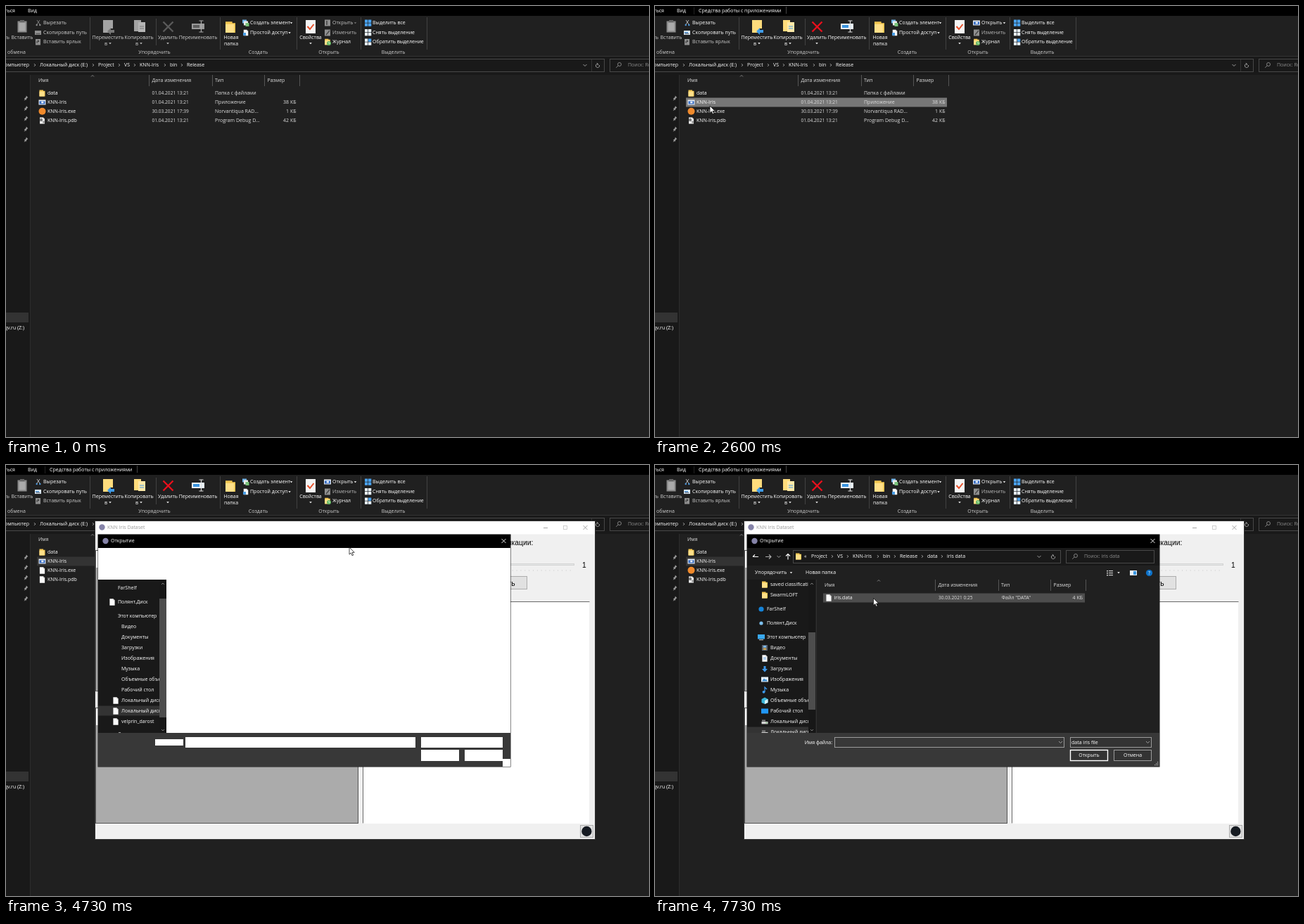
An HTML page for the animation above (8000 ms loop, 914 by 613 pixels).

```html
<!DOCTYPE html>
<html lang="ru">
<head>
<meta charset="utf-8">
<title>KNN Iris</title>
<style>
html, body { margin: 0; width: 100%; height: 100%; overflow: hidden; background: #202020; }
svg { display: block; }
#stage { width: 100vw; height: 100vh; }
text { font-family: "Open Sans", "Noto Sans", sans-serif; white-space: pre; }
text.form { font-family: "Liberation Sans", sans-serif; }
</style>
</head>
<body>
<svg id="stage" viewBox="0 0 914 613"></svg>
<script>
const LOOP = 8000;
const stage = document.getElementById('stage');

// Drawing helpers; text is placed by its vertical centre.
const rect = (x, y, w, h, fill, more = '') =>
  `<rect x="${x}" y="${y}" width="${w}" height="${h}" fill="${fill}" ${more}/>`;
const frame = (x, y, w, h, stroke, fill = 'none', sw = 1) =>
  rect(x + .5, y + .5, w - 1, h - 1, fill, `stroke="${stroke}" stroke-width="${sw}"`);
const dot = (x, y, r, fill) => `<circle cx="${x}" cy="${y}" r="${r}" fill="${fill}"/>`;
const line = (d, stroke = '#fff', sw = 1) =>
  `<path d="${d}" fill="none" stroke="${stroke}" stroke-width="${sw}"/>`;
const fill = (d, color) => `<path d="${d}" fill="${color}"/>`;
const at = (x, y, body, s = 1) => `<g transform="translate(${x} ${y}) scale(${s})">${body}</g>`;
const group = (id, body) => `<g id="${id}">${body}</g>`;
const text = (x, y, s, color = '#fff', anchor = 'start', size = /^\d\d\./.test(s) ? 6.6 : 7, cls = '') =>
  `<text class="${cls}" x="${x}" y="${y + size * .35}" font-size="${size}" fill="${color}" text-anchor="${anchor}">${s}</text>`;
const mid = (x, y, s, color) => text(x, y, s, color, 'middle');
const form = (x, y, s, size = 10.3, anchor = 'start') => text(x, y, s, '#000', anchor, size, 'form');
const down = (x, y, color = '#fff') => fill(`M${x - 1.8} ${y - .8}h3.6l-1.8 2z`, color);
const chevron = (x, y, color = '#aaa') => line(`M${x - 2.5} ${y - 1}l2.5 2.5 2.5-2.5`, color, .9);
const next = (x, y) => line(`M${x - 1} ${y - 1.8}l1.8 1.8-1.8 1.8`, '#ccc', .8);
const cross = (x, y, r, color, sw = 1) =>
  line(`M${x - r} ${y - r}l${2 * r} ${2 * r}m0 ${-2 * r}l${-2 * r} ${2 * r}`, color, sw);

// Small icons
const folder = (x, y, s = 1) => at(x, y,
  fill('M-4-4.5h5.5v1.2H4V4.5h-8z', '#f3c650') + fill('M-4-2.4h7v6.9h-7z', '#ffe08a'), s);
const doc = (x, y, s = 1) => at(x, y,
  fill('M-3.6-4.8h5l2.2 2.2v7.4h-7.2z', '#fafafa') + fill('M1.4-4.8v2.2h2.2z', '#bbb'), s);
const app = (x, y, c = '#3a6fc4') => at(x, y,
  rect(-5, -3.5, 10, 7, '#e9eef5') + rect(-4, -1.7, 8, 4.2, c) + rect(-1.2, -1.2, 3, 2.5, '#fff'));
const pin = y => at(28, y, fill('M.8-3.4l2.6 2.6-1 .3-1.3 1.5-.1 1.5-1.2-.2-2.2 1.4 1.2-2.4-1.1-1.2 1.4 0L.5-1.8z', '#999'));
const lens = (x, y) => `<circle cx="${x + 1}" cy="${y - 1}" r="2.5" fill="none" stroke="#999" stroke-width=".8"/>` +
  line(`M${x - .8} ${y + .8}l-3 3`, '#999', .8);
const refresh = (x, y) => line(`M${x + 2.4} ${y - 1}a2.6 2.6 0 1 1-2-1.6m0 0l-1.6-1.2m1.6 1.2v2`, '#bbb', .8);
const disk = rect(-4.5, 0, 9, 3.4, '#d6d6d6') + rect(1.5, 1.2, 2, 1, '#4a4') + rect(-4, -2.5, 5, 2, '#888');

function ribbon(on) {
  const ink = on ? '#fff' : '#cfcfcf';
  const c = color => on ? color : '#8f8f8f';
  const tile = (x, y, color) => [0, 1, 2, 3].map(i =>
    rect(x + i % 2 * 5, y + (i >> 1) * 5, 4.3, 4.3, i === color ? '#4aa3f0' : color < 0 ? '#4aa3f0' : '#e8f2fc')).join('');
  const big = (x, body) => at(x, 29, body);
  const sheet = on ? '#ffdc7c' : '#a3a3a3';
  return rect(0, 0, 914, 14, '#000') + rect(0, 14, 914, 58, '#202020') +
    text(13, 7, 'ться', '#fff', 'end') + text(31, 7, 'Вид') +
    (on ? text(62, 7, 'Средства работы с приложениями') + rect(55, 2, 1, 10, '#222') + rect(186, 1, 1, 10, '#444') : '') +
    [119, 304, 413, 504, 598].map(x => rect(x, 16, 1, 46, '#414141')).join('') + rect(213, 18, 1, 38, '#414141') +
    text(2, 66, 'обмена', '#ccc') + mid(211, 66, 'Упорядочить', '#ccc') + mid(358.5, 66, 'Создать', '#ccc') +
    mid(459, 66, 'Открыть', '#ccc') + mid(550.5, 66, 'Выделить', '#ccc') +
    // clipboard
    text(5, 45, 'ть', '#ccc', 'end') + mid(23, 45, 'Вставить', '#cfcfcf') +
    rect(16.5, 21.5, 13, 16, '#8a8a8a') + rect(18.5, 24, 9, 11.5, '#aaa') + rect(20, 20, 6, 3, '#666') +
    line('M44 20l4 6m0-6l-4 6', c('#d8d8d8'), .8) + dot(43.7, 27, 1.2, c('#4f9be0')) + dot(48.3, 27, 1.2, c('#4f9be0')) +
    text(53, 24, 'Вырезать', ink) +
    rect(41, 35, 9, 6, c('#dceaf7')) + rect(42, 37, 5, 1.5, c('#3d7fc0')) + line('M42.5 39.5h6', '#333', .7) +
    text(53, 38, 'Скопировать путь', ink) +
    rect(42, 47, 7, 8.5, '#8f8f8f') + line('M44 53v-3h3m-1.4-1.4l1.4 1.4-1.4 1.4', '#222', .8) + text(53, 51, 'Вставить ярлык', '#c6c6c6') +
    // organise
    big(146, rect(-8, -9, 11, 18, sheet) + rect(1, -9, 5, 12, sheet) + fill('M8 5h-5v-3l-5 5 5 5v-3h5z', on ? '#3f9be8' : '#777')) +
    mid(145, 45, 'Переместить', ink) + text(140, 54, 'в', ink) + down(148, 53, ink) +
    big(190, rect(-8, -9, 10, 16, sheet) + rect(-2, -6, 10, 14, on ? '#ffe9a8' : '#b5b5b5') + line('M0 0h6M0 3h6', on ? '#3f9be8' : '#777')) +
    mid(189, 45, 'Копировать', ink) + text(184, 54, 'в', ink) + down(192, 53, ink) +
    cross(230.5, 29.5, 7, on ? '#e8101c' : '#5a5a5a', 2.4) + mid(230, 45, 'Удалить', ink) + down(230, 53, ink) +
    big(273, rect(-9, -4, 18, 8, on ? '#e8f1fa' : '#9a9a9a') + rect(-7, -2, 9, 4, on ? '#3b94e0' : '#5e5e5e') +
      line('M1.5-8h6m-3 0v16m-3 0h6', on ? '#ddd' : '#aaa', 1.2)) +
    mid(273, 45, 'Переименовать', ink) +
    // create
    folder(319, 30, 1.75) + mid(320, 45, 'Новая') + mid(320, 54, 'папка') +
    rect(336, 19.5, 6, 5, '#6fb4ea') + rect(338, 21.5, 6, 6, '#eee') + rect(340.5, 24, 5, 5, '#79c37a') +
    text(347, 24, 'Создать элемент') + down(405.5, 24) + doc(341, 38, .9) + rect(337, 38, 4, 4, '#4a9ee6') +
    text(347, 38, 'Простой доступ') + down(403, 38) +
    // open
    rect(426, 20, 14, 19, '#f5f5f5') + line('M428.5 29l3.5 4 5.5-7', '#e8502a', 2) + mid(433, 45, 'Свойства') + down(433, 53) +
    (on ? app(457, 24) : rect(453, 19.5, 8, 9, '#8f8f8f') + rect(455, 21, 2, 6, '#555')) +
    text(464, 24, 'Открыть', on ? '#fff' : '#c2c2c2') + down(496.5, 24, on ? '#fff' : '#777') +
    rect(453, 33.5, 8, 9, '#8f8f8f') + line('M455 41l5-6', '#444', 1.2) + text(464, 38, 'Изменить', '#b8b8b8') +
    folder(457, 51, .95) + dot(459, 53, 3, '#65b965') + line('M459 51.2v2h1.5', '#fff', .7) + text(464, 51, 'Журнал') +
    tile(510, 19.5, -1) + tile(510, 33, 9) + tile(510, 46.5, 1) +
    text(521, 24, 'Выделить все') + text(521, 38, 'Снять выделение') + text(521, 51, 'Обратить выделение');
}

const crumbs = (list, y) => list.map(([x, s], i) => (i ? next(x - 7, y) : '') + text(x, y, s)).join('');
const columns = (dx, y, caretX) => [['Имя', 46], ['Дата изменения', 207.5], ['Тип', 297], ['Размер', 371.5]]
    .map(([s, x]) => text(x + dx, y, s, '#dedede')).join('') +
  [203, 293, 367, 417].map(x => rect(x + dx, y - 8, 1, 16, '#555')).join('') +
  line(`M${caretX - 2} ${y - 5.5}l2-2 2 2`, '#aaa', .7);
const fileRow = (dx, y, name, date, kind, size = '') => text(59 + dx, y, name) + text(207.5 + dx, y, date, '#dedede') +
  text(297 + dx, y, kind, '#dedede') + text(412.5 + dx, y, size, '#dedede', 'end');

function explorer() {
  const rows = [['data', '01.04.2021 13:21', 'Папка с файлами'], ['KNN-Iris', '01.04.2021 13:21', 'Приложение', '38 КБ'],
    ['KNN-Iris.exe', '30.03.2021 17:39', 'Norvantiqua RAD...', '1 КБ'], ['KNN-Iris.pdb', '01.04.2021 13:21', 'Program Debug D...', '42 КБ']];
  return rect(0, 0, 914, 613, '#202020') + group('ribOff', ribbon(false)) + group('ribOn', ribbon(true)) +
    rect(0, 71, 914, 1, '#333') + rect(0, 72, 914, 26, '#191919') +
    frame(-2, 75, 853, 19, '#484848') + rect(832, 76, 1, 17, '#333') + frame(858, 75, 80, 19, '#484848') +
    text(33, 84, 'омпьютер', '#fff', 'end') +
    crumbs([[-20, ''], [48, 'Локальный диск (E:)'], [131, 'Project'], [168, 'VS'], [190, 'KNN-Iris'], [233, 'bin'], [257, 'Release']], 84) +
    chevron(823, 84) + refresh(841, 85) + lens(871, 84) + text(884, 84, 'Поиск: Release', '#8c8c8c') +
    rect(0, 98, 34, 515, '#191919') + rect(34, 98, 1, 515, '#2c2c2c') +
    [131, 145.5, 160, 175, 190].map(pin).join('') + rect(0, 436, 32, 14, '#333') + text(26, 458, 'qv.ru (Z:)', '#fff', 'end') +
    rect(35, 98, 168, 16, '#434343', 'id="headHover"') + columns(0, 106, 123) +
    rows.map((r, i) => rect(44, 117.5 + 13 * i, 371, 13, 'none', `id="row${i}"`) + fileRow(0, 124 + 13 * i, ...r)).join('') +
    folder(51.5, 124) + app(51.5, 137) + group('exe', dot(51.5, 149.8, 5, '#f08a2c')) + group('exeDoc', doc(51.5, 150)) +
    group('pdb', doc(51.5, 163, .95) + dot(50, 162, 2.2, '#777') + dot(53.5, 165, 1.7, '#999')) + group('pdbDoc', doc(51.5, 163));
}

const button = (x, y, w, h, id = '') => frame(x, y, w, h, '#adadad', '#e1e1e1') + (id ? frame(x, y, w, h, '#0078d7', '#e5f1fb').replace('<rect', `<rect id="${id}"`) : '');
const toolX = [389, 411, 434, 456, 478];

function grid(y, h, heads) {
  const head = ([a, b], i) => {
    const x = 132 + 62 * i;
    return b ? form(x, y + 8, a, 8.8) + form(x, y + 18, b, 8.8) : form(x, y + 12.5, a, 8.8);
  };
  return rect(127, y, 373, h, '#ababab') + rect(127, y, 373, 25, '#fff') +
    heads.slice(1).map((_, i) => rect(189 + 62 * i, y + 1, 1, 24, '#e2e2e2')).join('') +
    heads.map(head).join('') + frame(127, y, 374, h, '#555');
}

function appWindow() {
  const sizes = [['Длина', 'чашелистика'], ['Ширина', 'чашелистика'], ['Длина', 'лепестка'], ['Ширина', 'лепестка'], ['Тип ириса']];
  const white = (x, y, w, h) => rect(x, y, w, h, '#fff');
  const title = color => text(144, 89, 'KNN Iris Dataset', color) + line('M764 89.5h6', color, .9) + cross(823.5, 89, 3, color, .9);
  const blank = white(134, 104, 122, 12) + white(478, 100, 20, 20) + white(127, 121, 373, 201) + white(134, 327, 136, 12) +
    toolX.map(x => white(x, 324, 20, 20)).join('') + white(128, 346, 372, 24) + rect(127, 345, 63, 1, '#777') +
    rect(127, 370, 373, 139, '#ababab') + white(816, 512, 19, 19);
  const ready = form(136, 110, 'Данные ирисов Фишера:') + button(478, 100, 19, 19, 'loadHover') + folder(487.5, 110, 1.5) +
    grid(121, 201, [['№'], ...sizes]) + form(136, 333, 'Ирисы для классификации:') +
    toolX.map(x => button(x, 324, 19, 19)).join('') +
    dot(398.5, 333.5, 7.5, '#3fae5a') + line('M394.5 333.5h8m-4-4v8', '#fff', 1.2) +
    dot(421, 333.5, 7.5, '#e04f3f') + cross(421, 333.5, 2.6, '#fff', 1.2) +
    rect(438.5, 329, 10, 12, '#2a9d4b') + rect(437, 326.5, 13, 2, '#2a9d4b') +
    rect(458.5, 326, 15, 15, '#30343f') + rect(461, 326, 10, 5, '#dfe6f0') + rect(461, 334, 10, 7, '#f5c93d') +
    folder(487.5, 334, 1.5) + grid(345, 165, sizes) +
    button(816, 512, 19, 18) + group('focus', frame(816, 512, 19, 18, '#0078d7', 'none', 1.6)) + dot(825.4, 521, 7.2, '#161b22');
  return rect(126, 79, 712, 454, '#333') + rect(127, 80, 710, 452, '#f0f0f0') + rect(127, 80, 710, 18.5, '#fff') +
    dot(136.5, 88.5, 4.2, '#8583a8') + group('titleOn', title('#000')) + group('titleOff', title('#999')) +
    frame(792, 86, 6, 6, '#c4c4c4', 'none', .8) +
    form(671.5, 110, 'Параметры для классификации:', 10.3, 'middle') + form(507, 128, 'Значение классификатора k:') +
    frame(512, 140, 296, 3, '#d2d2d2', '#e7eaea') + fill('M511.5 136.5h7v8.5l-3.5 3.5-3.5-3.5z', '#0078d7') +
    '<path d="M515 150h292" stroke="#c4c4c4" stroke-dasharray="1 4.85"/>' + form(819, 142, '1') +
    button(616, 158, 125, 19) + form(677.5, 168, 'Классифицировать', 10.3, 'middle') + form(507, 186, 'Результат классификации:') +
    rect(507, 194, 322, 316, '#fff') + line('M507.5 509.5V194.5h322', '#696969') +
    group('blank', blank) + group('ready', ready);
}

const glyphs = {
  pc: rect(-5, -4, 10, 6.5, '#39a9f0') + rect(-3, 3.2, 6, 1, '#ccc'),
  film: rect(-4, -4, 8, 8, '#5a6472') + rect(-2, -3, 4, 2.6, '#7dbcf0') + rect(-2, .4, 4, 2.6, '#c9a24f'),
  doc: doc(0, 0) + line('M-2-1h4M-2 1h4', '#4a90d9', .8),
  down: fill('M-1.5-4h3v4H4L0 4.5-4 0h2.500z', '#3d97ea'),
  image: rect(-5, -3.5, 10, 7, '#e8f3fc') + fill('M-4 2.500l3-4 2 2 1-1 2 3z', '#3b8bd0'),
  music: dot(-1.5, 2.8, 1.9, '#3d9cf0') + line('M0 3v-7l3 3', '#3d9cf0', 1.2),
  cube: fill('M0-4.500L4.500-2v5L0 5l-4.500-2v-5z', '#3bb5d8') + fill('M0 0l4.500-2v5L0 5z', '#d7f0f6'),
  desk: rect(-5, -3.5, 10, 7, '#2196f3'),
  disk, folder: folder(0, 0), cloud: dot(0, 0, 3.6, '#1583d8'), drive: dot(0, 0, 2.6, '#7cc0ee')
};
const places = [['saved classification', 5, 170, 'folder'], ['SwarmLOFT', 5, 185, 'folder'], ['FarShelf', 0, 205, 'cloud'],
  ['Полянт.Диск', 0, 225, 'drive'], ['Этот компьютер', 0, 245, 'pc'], ['Видео', 5, 260, 'film'], ['Документы', 5, 275, 'doc'],
  ['Загрузки', 5, 290, 'down'], ['Изображения', 5, 305, 'image'], ['Музыка', 5, 320, 'music'], ['Объемные объекты', 5, 335, 'cube'],
  ['Рабочий стол', 5, 350, 'desk'], ['Локальный диск (C:)', 5, 365, 'disk'], ['Локальный диск (E:)', 5, 380, 'disk'],
  ['velprin_darost', 5, 395, 'disk'], ['Сеть', 0, 413, 'pc']];

function sidebar(early) {
  const shift = early ? -30 : 0;
  const items = places.map(([s, dx, y, icon]) => {
    const mark = early ? (icon === 'disk' || icon === 'drive' ? doc(0, 0) : '') : glyphs[icon];
    return (s.includes('(E:') ? rect(131, y - 7.5 + shift, 87, 14, '#333') : '') +
      at(151 + dx, y + shift, mark) + text(159 + dx, y + shift, s);
  }).join('');
  const thumb = early ? [190, 169] : [238, 110];
  return `<svg x="131" y="163" width="97" height="218" viewBox="131 163 97 218">${rect(131, 163, 97, 218, '#191919') + items +
    rect(218, 163, 10, 218, '#171717') + rect(218, thumb[0], 10, thumb[1], '#4d4d4d') +
    line('M221 170l2-2 2 2M221 376l2 2 2-2', '#999', .8)}</svg>`;
}

function dialog() {
  const dx = 195.5;
  const early = rect(131, 118, 586, 263, '#fff') + sidebar(true) +
    [[212, 390, 40, 9], [255, 387, 327, 15], [590, 387, 116, 15], [590, 405, 54, 16], [652, 405, 54, 16], [706, 418, 11, 11]]
      .map(b => rect(...b, '#fff')).join('');
  const path = [[222, 'Project'], [259, 'VS'], [281, 'KNN-Iris'], [324, 'bin'], [348, 'Release'], [387, 'data']];
  const place = (id, tail, find, list) => group(id, crumbs(tail ? [...path, [415, tail]] : path, 130) +
    text(610, 130, 'Поиск: ' + find, '#8c8c8c') + list);
  const data = (i, name, date, size) => doc(247, 189 + 13 * i) + fileRow(dx, 189 + 13 * i, name, date, 'Файл "DATA"', size);
  const dir = (i, name, date) => folder(247, 189 + 13 * i) + fileRow(dx, 189 + 13 * i, name, date, 'Папка с файлами');
  const arrow = (x, dir, color) => line(`M${x - 4} 130.500h8M${x + dir} 127.500l${dir * 3} 3-${dir < 0 ? '-' : ''}3 3`, color, 1.1);
  const full = rect(131, 118, 586, 263, '#202020') + rect(131, 118, 586, 25, '#191919') +
    group('backOff', arrow(143, -1, '#aaa')) + group('backOn', arrow(143, -1, '#fff')) + arrow(161, 1, '#aaa') + chevron(176, 130) +
    line('M189 134.500v-8m-3 3l3-3 3 3', '#fff', 1.1) + frame(196, 121, 381, 19, '#484848') + folder(204, 130) + text(212, 129.5, '«') +
    rect(384, 122, 21, 17, '#424242', 'id="crumbHover"') + chevron(546, 130) + refresh(566, 131) +
    frame(584, 121, 126, 19, '#484848') + lens(597, 130) +
    text(142, 153, 'Упорядочить') + down(193.5, 153) + text(214, 153, 'Новая папка') +
    [150, 153, 156].map(y => rect(642, y, 2, 1.5, '#ccc') + rect(645, y, 6, 1.2, '#ccc')).join('') + down(659, 153) +
    rect(675, 150, 10, 7, '#e8f2fb') + rect(680, 151, 4, 5, '#3b97e3') + dot(702.5, 153.5, 4.6, '#0d72c9') + mid(702.5, 153.5, '?') +
    sidebar(false) + rect(229, 163, 1, 218, '#303030') +
    group('listHead', rect(231, 163, 168, 16, '#434343') + chevron(393.5, 171)) + columns(195, 171, 318) +
    rect(239, 182.5, 372, 13, 'none', 'id="fileRow"') +
    place('inSaved', 'saved classification files', 'saved classification f...',
      data(0, '1-4-2021 13-42-13.data', '01.04.2021 13:42', '1 КБ') + data(1, '1-4-2021 13-42-14.data', '01.04.2021 13:42', '1 КБ') +
      data(2, '1-4-2021 13-45-56.data', '01.04.2021 13:45', '1 КБ')) +
    place('inData', '', 'data', dir(0, 'iris data', '01.04.2021 13:21') + dir(1, 'saved classification files', '01.04.2021 13:45')) +
    place('inIris', 'iris data', 'iris data', data(0, 'iris.data', '30.03.2021 0:25', '4 КБ')) +
    text(252, 394.5, 'Имя файла:', '#fff', 'end') + frame(255, 387, 327, 15, '#9b9b9b', '#383838') +
    group('inputFocus', frame(255, 387, 327, 15, '#fff')) + rect(258, 390, .8, 10, '#fff', 'id="caret"') + chevron(576.5, 394) +
    frame(590, 387, 116, 15, '#9b9b9b', '#333') + text(592, 394.5, 'data iris file') + chevron(700.5, 394) +
    frame(590, 405, 54, 16, '#fff', '#333', 1.4) + mid(617, 413, 'Открыть') + frame(652, 405, 54, 16, '#9b9b9b', '#333') + mid(679, 413, 'Отмена') +
    [[0, 0], [2, 0], [4, 0], [2, -2], [4, -2], [4, -4]].map(([x, y]) => rect(710 + x, 426 + y, 1.2, 1.2, '#aaa')).join('');
  return rect(130.5, 98.5, 587, 331, '#111') + rect(131, 99, 586, 19, '#000') + dot(141.5, 108, 4.2, '#8583a8') +
    text(149, 108, 'Открытие') + cross(707.5, 108, 3, '#fff', .9) + rect(131, 381, 586, 48, '#383838') +
    group('dlgBlank', early) + group('dlgFull', full);
}

stage.innerHTML = explorer() + group('win', appWindow()) + group('dlg', dialog()) +
  group('cursor', '<path d="M0 0v10.200l2.300-2.200 1.700 3.800 1.700-.7-1.700-3.700h3.200z" fill="#fff" stroke="#000" stroke-width=".7"/>');

const parts = {};
stage.querySelectorAll('[id]').forEach(el => parts[el.id] = el);
const show = (id, on) => parts[id].style.display = on ? '' : 'none';

// part, shown from, shown until
const steps = [['ribOff', 0, 2600], ['ribOn', 2600, LOOP], ['win', 2730, LOOP], ['blank', 2730, 2870], ['ready', 2870, LOOP],
  ['titleOn', 0, 4200], ['titleOff', 4200, LOOP], ['focus', 0, 4130], ['dlg', 4530, LOOP], ['dlgBlank', 4530, 4870], ['dlgFull', 4870, LOOP],
  ['exe', 0, 4530], ['exeDoc', 4530, 5200], ['exe', 5200, LOOP], ['pdb', 0, 4530], ['pdbDoc', 4530, 5000], ['pdb', 5000, LOOP],
  ['inSaved', 0, 6330], ['inData', 6330, 7730], ['inIris', 7730, LOOP], ['backOff', 0, 6330], ['backOn', 6330, LOOP],
  ['inputFocus', 0, 7400], ['cursor', 70, LOOP]];

// pointer stops: time, x, y
const stops = [[70, 898, 600], [470, 430, 270], [700, 130, 104], [870, 3, 110], [930, 8, 112], [1330, 78, 142], [2870, 78, 142],
  [3400, 318, 205], [3730, 446, 106], [3870, 488, 117], [5000, 488, 117], [5130, 387.5, 166.5], [5400, 372, 196],
  [5730, 388, 150], [6000, 395, 131], [6330, 395, 131], [7000, 310.5, 189.5], [LOOP, 310.5, 189.5]];

const still = (a, b) => a[1] === b[1] && a[2] === b[2];
function slope(i, k) {
  const a = stops[i - 1], p = stops[i], b = stops[i + 1];
  return !a || !b || still(a, p) || still(p, b) ? 0 : (b[k] - a[k]) / (b[0] - a[0]);
}
function pointer(t) {
  let i = 0;
  while (i < stops.length - 2 && t >= stops[i + 1][0]) i++;
  const a = stops[i], b = stops[i + 1], span = b[0] - a[0];
  const u = Math.max(0, (t - a[0]) / span), v = 1 - u;
  return [1, 2].map(k => v * v * (1 + 2 * u) * a[k] + u * u * (3 - 2 * u) * b[k] +
    span * u * v * (v * slope(i, k) - u * slope(i + 1, k)));
}

function draw(t) {
  const lit = new Set(steps.filter(([, from, to]) => t >= from && t < to).map(s => s[0]));
  steps.forEach(([id]) => show(id, lit.has(id)));
  const [x, y] = pointer(t);
  parts.cursor.setAttribute('transform', `translate(${x.toFixed(2)} ${y.toFixed(2)})`);
  const over = (l, tp, r, b) => t >= 70 && x >= l && x < r && y >= tp && y < b;
  const free = t < 2730 || x < 126;
  const tint = (hover, picked) => picked ? (hover ? '#777' : '#333') : hover ? '#4d4d4d' : 'none';
  for (let i = 0; i < 4; i++) {
    const top = 117.5 + 13 * i;
    parts['row' + i].setAttribute('fill', tint(free && over(44, top, 415, top + 13), i === 1 && t >= 2330));
  }
  show('headHover', free && over(35, 98, 203, 114));
  show('loadHover', t < 4200 && over(478, 100, 497, 119));
  show('listHead', over(231, 163, 399, 179));
  show('crumbHover', t < 6330 && over(384, 121, 406, 140));
  parts.fileRow.setAttribute('fill', tint(over(239, 182.5, 611, 195.5), t >= 7400 && t < 7730));
  show('caret', t < 7400 && Math.floor((t - 4870) / 530) % 2 === 0);
}

const start = performance.now();
function tick() {
  draw((performance.now() - start) % LOOP);
  requestAnimationFrame(tick);
}
tick();
</script>
</body>
</html>
```
